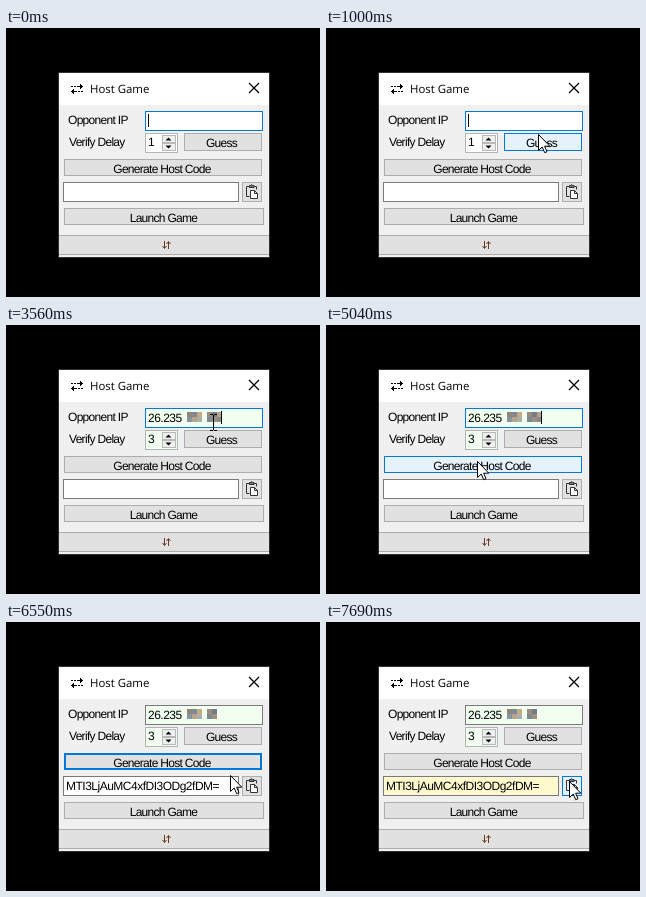
Recreate the animation shown at these times as an HTML page. Size 314x269 px, loop 8 s.

```html
<!DOCTYPE html>
<html>
<head>
<meta charset="utf-8">
<style>
html, body { margin: 0; width: 100%; height: 100%; overflow: hidden; background: #000; }
svg { display: block; width: 314px; height: 269px; }
rect, .crisp { shape-rendering: crispEdges; }
text {
  font: 12px "Liberation Sans", Arial, sans-serif;
  letter-spacing: -.5px;
  text-rendering: geometricPrecision;
}
.ui { letter-spacing: -.7px; }
.mid { text-anchor: middle; }
.title { font: 11.4px "Open Sans", "Noto Sans", sans-serif; letter-spacing: 0; }
.line { fill: none; stroke: #000; }
</style>
</head>
<body>
<svg viewBox="0 0 314 269">
  <rect x="52" y="44" width="212" height="186" fill="#303030"/>
  <rect x="53" y="45" width="210" height="184" fill="#f0f0f0"/>
  <rect x="53" y="45" width="210" height="32" fill="#fff"/>
  <path class="crisp" d="M65 58h2v1h-2zM68 58h2v1h-2zM71 58h6v1h-6zM74 56h1v5h-1zM75 57h1v3h-1zM65 63h6v1h-6zM72 63h2v1h-2zM75 63h2v1h-2zM67 61h1v5h-1zM66 62h1v3h-1z"/>
  <text class="title" x="84" y="65">Host Game</text>
  <path class="line" stroke-width="1.3" d="M243 55l10 10m0-10l-10 10"/>

  <text class="ui" x="62" y="96">Opponent IP</text>
  <text class="ui" x="63" y="118">Verify Delay</text>
  <g id="boxes"></g>

  <rect x="156" y="107" width="14" height="8" fill="#f0f0f0"/>
  <rect x="156" y="115" width="14" height="8" fill="#f0f0f0"/>
  <path class="line crisp" style="stroke:#b9b9b9" d="M156.500 107.500h13v7h-13zM156.500 115.500h13v7h-13z"/>
  <path d="M159.500 112.500l3-3 3 3zM159.500 117.500h6l-3 3z"/>
  <text id="delay" x="142" y="118"></text>
  <text id="ip" x="142" y="97">26.235</text>
  <g id="mosaic"></g>
  <rect id="caret" y="86" width="1" height="13"/>
  <text id="code" x="60" y="168">MTI3LjAuMC4xfDI3ODg2fDM=</text>

  <text class="ui mid" x="215.500" y="119">Guess</text>
  <text class="ui mid" x="156" y="145">Generate Host Code</text>
  <text class="ui mid" x="157.500" y="194">Launch Game</text>

  <g class="line" style="stroke:#333">
    <path d="M243.500 168.500h-3v-10h10v3"/>
    <path d="M243.500 159.500v-2h1.500q.500-2 1.500 0h1.500v2z" fill="#777"/>
    <path d="M244.500 162.500h4l3 3v5h-7zM248.500 162.500v3h3" fill="#fff"/>
  </g>

  <rect x="53" y="207" width="210" height="20" fill="#adadad"/>
  <rect x="53" y="208" width="210" height="18" fill="#e1e1e1"/>
  <path class="line" style="stroke:#6b3a1e" d="M158.500 213v7M156.500 218l2 2.500 2-2.500M162.500 221v-7M160.500 216l2-2.500 2 2.500"/>

  <circle id="busy" cx="257" cy="160.500" r="6" fill="none" stroke="#2f8fd0" stroke-width="3"/>
  <path id="arrow" d="M-.500.500v16l3.700-3.500 2.500 5.700 2.300-1-2.400-5.500h5.200z" fill="#fff" stroke="#000"/>
  <path id="beam" class="line crisp" d="M-3-7.500h3m1 0h3M.500-7v15M-3 8.500h3m1 0h3"/>
</svg>
<script>
const LOOP = 8000;
const BLUE = '#0078d7';
const $ = id => document.getElementById(id);

function addRect(parent, x, y, w, h, fill) {
  const r = document.createElementNS('http://www.w3.org/2000/svg', 'rect');
  Object.entries({ x, y, width: w, height: h, fill }).forEach(([k, v]) => r.setAttribute(k, v));
  return $(parent).appendChild(r);
}

// A bordered control; paint(border, fill, thickness) restyles it
function box(x, y, w, h) {
  const outer = addRect('boxes', x, y, w, h);
  const inner = addRect('boxes', x, y, w, h);
  return {
    has: p => p.x >= x && p.x < x + w && p.y >= y && p.y < y + h,
    paint(border, fill, n = 1) {
      outer.setAttribute('fill', border);
      inner.setAttribute('fill', fill);
      [x + n, y + n, w - 2 * n, h - 2 * n].forEach((v, i) =>
        inner.setAttribute(['x', 'y', 'width', 'height'][i], v));
    }
  };
}

const ipBox = box(139, 83, 118, 20);
const delayBox = box(139, 105, 33, 20);
const codeBox = box(57, 154, 176, 20);
const guess = box(178, 105, 78, 18);
const generate = box(58, 131, 198, 17);
const copy = box(236, 154, 20, 20);
const launch = box(58, 180, 200, 17);

function blocks(x, colors) {
  const cols = colors.length / 2;
  return colors.map((c, i) =>
    addRect('mosaic', x + i % cols * 5, 87 + Math.floor(i / cols) * 5, 5, 5, c));
}
blocks(181, ['#8f8778', '#7f8a94', '#c9a986', '#86949c', '#b8a58b', '#a9b0b0']);
blocks(201, ['#9a8f7d', '#747d87', '#7d8994', '#a09080']);
const tail = blocks(211, ['#b0a594', '#8d8a86']);

// start, step length, steps, from, to
const moves = [
  [300, 78, 9, 305, 213, 213, 106],
  [1080, 80, 1, 207, 98, 208, 99],
  [1540, 80, 1, 197, 95, 206, 99],
  [1930, 70, 1, 207, 98, 207, 97],
  [4410, 80, 6, 207, 97, 152, 136],
  [5270, 77, 3, 152, 136, 154, 136],
  [5960, 79, 10, 154, 136, 244, 158],
  [6920, 60, 1, 244, 158, 244, 159]
];

function pointer(t) {
  const m = moves.filter(m => t >= m[0] - 3).pop();
  if (!m) return { x: -50, y: -50 };
  const [start, step, n, x0, y0, x1, y1] = m;
  const u = Math.min(1, Math.floor((t - start + 3) / step) / n);
  const e = u * u * (3 - 2 * u);
  return { x: Math.round(x0 + (x1 - x0) * e), y: Math.round(y0 + (y1 - y0) * e) };
}

const show = (el, on) => el.style.display = on ? '' : 'none';

function draw(t) {
  const within = (a, b) => t >= a && t < b;
  const p = pointer(t);
  const pasted = t >= 2780, verified = t >= 3560;
  const button = (b, pressed, focused) => {
    if (pressed) b.paint('#005499', '#cce4f7');
    else if (b.has(p)) b.paint(BLUE, '#e5f1fb');
    else if (focused) b.paint(BLUE, '#e1e1e1', 2);
    else b.paint('#adadad', '#e1e1e1');
  };

  ipBox.paint(t < 5270 ? BLUE : '#7a7a7a', pasted ? '#f0fff0' : '#fff');
  delayBox.paint('#b4b4b4', verified ? '#f0fff0' : '#fff');
  codeBox.paint(codeBox.has(p) || within(6920, 7210) ? '#333' : '#7a7a7a',
    t >= 7210 ? '#fffacd' : '#fff');
  button(guess);
  button(generate, within(5270, 5420), within(5420, 7130));
  button(copy, within(7130, 7290));
  button(launch);

  $('delay').textContent = verified ? 3 : 1;
  show($('ip'), pasted);
  show($('mosaic'), pasted);
  show($('code'), t >= 5420);

  const blink = !within(460, 1000) && !within(1930, 2550) && !within(4110, 5040) && t < 5270;
  show($('caret'), blink);
  $('caret').setAttribute('x', pasted ? 215 : 142);
  tail.forEach(r => show(r, blink));

  const overText = ipBox.has(p);
  for (const [id, on] of [['arrow', !overText], ['beam', overText]]) {
    show($(id), on);
    $(id).setAttribute('transform', `translate(${p.x} ${p.y})`);
  }
  show($('busy'), within(7520, 7690));
}

const begin = performance.now();
function tick() {
  draw((performance.now() - begin) % LOOP);
  requestAnimationFrame(tick);
}
tick();
</script>
</body>
</html>
```
